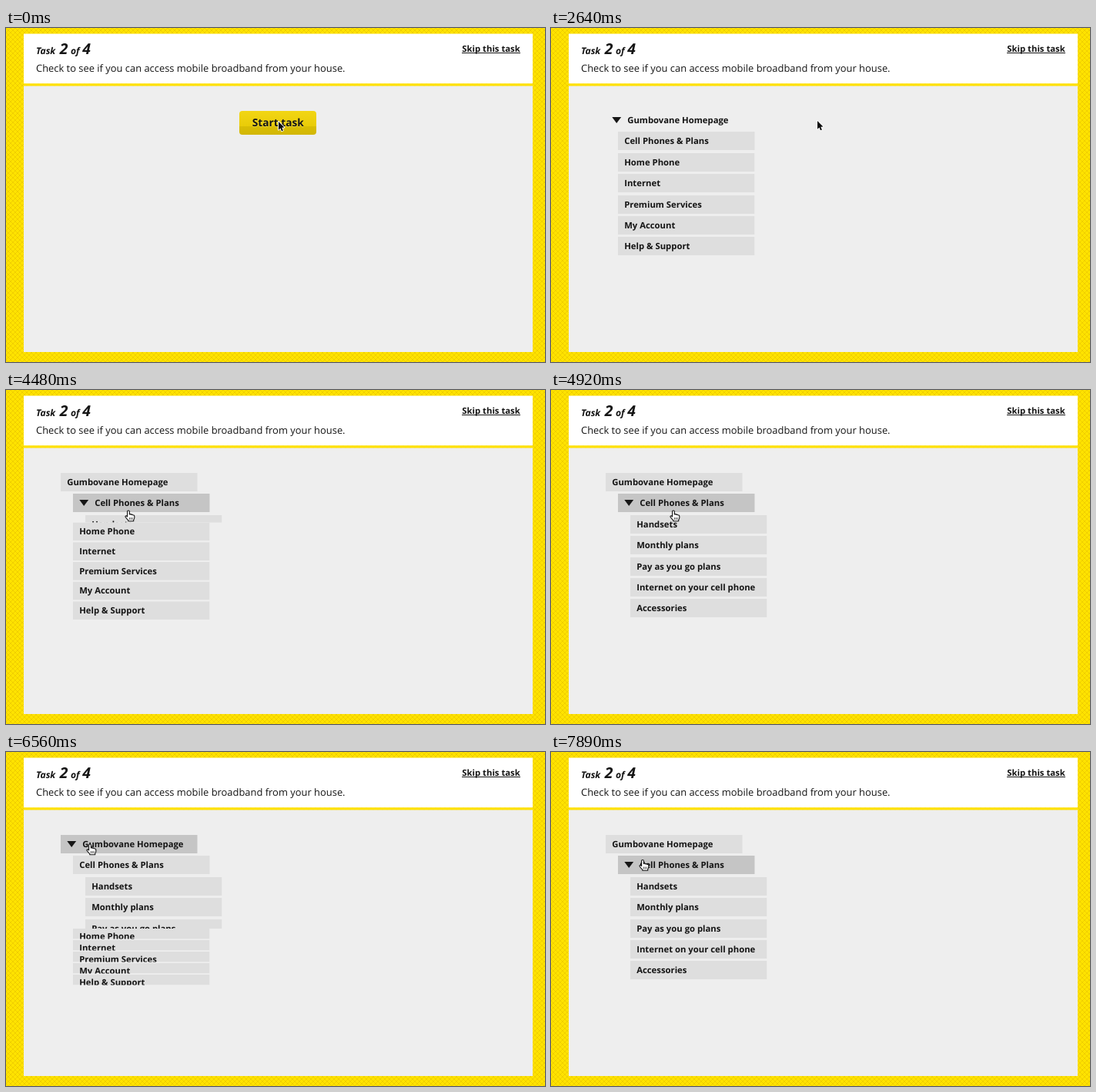
Write an HTML page with a canvas that moves like this. It is 700 px wide and 435 px high and loops after 8 s.

```html
<!DOCTYPE html>
<html lang="en">
<head>
<meta charset="utf-8">
<title>Task navigation</title>
<style>
  html, body { margin: 0; width: 100%; height: 100%; overflow: hidden; background: #ffe200; }
  canvas { display: block; width: 700px; height: 435px; }
</style>
</head>
<body>
<canvas id="stage" width="700" height="435"></canvas>
<script>
const ctx = document.getElementById('stage').getContext('2d');
const LOOP = 8000;
const PITCH = 27.4, TOP = 107.9, ROW_W = 177.5, ROW_H = 24;
const INK = '#151515', ROW = '#dedede', HOVER = '#c5c5c5';
const FONT = '"Open Sans", "Noto Sans", sans-serif';

const HOME = 'Gumbovane Homepage';
const SECTIONS = ['Cell Phones & Plans', 'Home Phone', 'Internet',
  'Premium Services', 'My Account', 'Help & Support'];
const PAGES = ['Handsets', 'Monthly plans', 'Pay as you go plans',
  'Internet on your cell phone', 'Accessories'];

// Pointer stops: time, x, y
const POINTER = [
  [0, 354, 122],
  [2500, 346, 121], [2650, 318, 119], [2800, 282, 118], [2940, 246, 118],
  [3090, 224, 119], [3240, 208, 121], [3380, 200, 124], [3530, 195, 126.5],
  [3680, 184, 134], [3830, 172, 141], [3980, 164, 146],
  [4480, 159, 157],
  [5520, 150, 153], [5670, 137, 145], [5820, 122, 134], [5970, 111.5, 125.5],
  [6120, 109, 122], [6260, 109, 120],
  [6850, 112, 127], [7000, 116, 135], [7140, 119, 140.5]
];

const ARROW = new Path2D('M0 0V10.7L2.4 8.5L4 12.2L5.9 11.4L4.3 7.8L7.4 7.6Z');
const HAND = new Path2D('M-1.4 8V1.4Q-1.4 0 0 0Q1.4 0 1.4 1.4V5Q3 4.2 3.9 5.4' +
  'Q5.4 4.7 6 6Q7.8 5.6 7.8 7.5V9.5Q7.6 11 6.7 12.3V13.8H-.2V12.6' +
  'Q-2.5 10.5 -4 8.2Q-4.2 6.6 -2.6 6.9Z');
const KNUCKLES = new Path2D('M1.4 9v3M3.3 9v3M5.2 9v3');

function makeHatch() {
  const tile = document.createElement('canvas');
  tile.width = tile.height = 6;
  const g = tile.getContext('2d');
  g.fillStyle = '#ffe300';
  g.fillRect(0, 0, 6, 6);
  g.strokeStyle = 'rgba(225, 185, 0, .55)';
  g.lineWidth = 0.9;
  g.beginPath();
  for (const d of [-6, 0, 6]) {
    g.moveTo(d - 1, -1); g.lineTo(d + 7, 7);
    g.moveTo(d + 7, -1); g.lineTo(d - 1, 7);
  }
  g.stroke();
  return ctx.createPattern(tile, 'repeat');
}
const hatch = makeHatch();

function rect(x, y, w, h, color) {
  ctx.fillStyle = color;
  ctx.fillRect(x, y, w, h);
}

function text(str, x, y, size, style = 'bold', color = INK) {
  ctx.font = `${style} ${size}px ${FONT}`;
  ctx.fillStyle = color;
  ctx.fillText(str, x, y);
}

function clipped(x, y, w, h, draw) {
  ctx.save();
  ctx.beginPath();
  ctx.rect(x, y, w, h);
  ctx.clip();
  draw();
  ctx.restore();
}

const rowY = i => Math.round(TOP + PITCH * i);
const rowX = level => Math.round(71 + 16.1 * level);

function drawPage() {
  rect(0, 0, 700, 435, hatch);
  rect(23, 7.5, 661, 65, '#fff');
  rect(23, 72.5, 661, 3, '#ffe100');
  rect(23, 75.5, 661, 346.5, '#eee');
  text('Task', 39, 34, 12.1, 'italic bold');
  text('2', 69.7, 34, 19.4, 'italic bold');
  text('of', 84, 34, 12.1, 'italic bold');
  text('4', 99.2, 34, 19.4, 'italic bold');
  text('Check to see if you can access mobile broadband from your house.', 39, 57, 12.91, 'normal');
  text('Skip this task', 592.3, 31, 11.3);
  rect(592, 32, 76, 1, INK);
}

function drawButton(pressed) {
  const fill = ctx.createLinearGradient(0, 108, 0, 139);
  fill.addColorStop(0, '#f2d614');
  fill.addColorStop(0.64, '#e9cc08');
  fill.addColorStop(0.65, '#d9be04');
  fill.addColorStop(1, '#d2b604');
  ctx.save();
  if (pressed) {
    ctx.shadowColor = 'rgba(95, 155, 215, .8)';
    ctx.shadowBlur = 5;
  }
  ctx.beginPath();
  ctx.roundRect(303, 108, 100, 31, 4);
  ctx.fillStyle = fill;
  ctx.fill();
  ctx.restore();
  text('Start task', 319.7, 129, 13.72, 'bold', 'rgba(255, 240, 120, .5)');
  text('Start task', 319.7, 128, 13.72);
}

// mode: 'link' has a box, 'open' has a marker and a box only under the pointer
function drawRow(label, level, y, tip, mode = 'link', h = ROW_H, base = 16) {
  const x = rowX(level), open = mode === 'open';
  const over = tip && tip.x >= x && tip.x < x + ROW_W && tip.y >= y && tip.y < y + h;
  if (over || !open) rect(x, y, ROW_W, h, over ? HOVER : ROW);
  if (open) {
    ctx.fillStyle = INK;
    ctx.beginPath();
    ctx.moveTo(x + 8.3, y + 8);
    ctx.lineTo(x + 20.2, y + 8);
    ctx.lineTo(x + 14.2, y + 16);
    ctx.fill();
  }
  text(label, x + (open ? 28.2 : 8.2), y + base, 11.3);
}

// Eased share of a slide that advances in a few even steps
function slide(since) {
  const step = Math.floor((since + 9) / 149);
  return 0.5 - Math.cos(Math.PI * Math.min(1, (64 + 148 * step) / 400)) / 2;
}

function menuState(t) {
  if (t < 4480) return { open: false, p: 0 };
  if (t < 6410) return { open: true, p: slide(t - 4480) };
  if (t < 7440) return { open: false, p: 1 - slide(t - 6410) };
  return { open: true, p: slide(t - 7440) };
}

function drawMenu(t, tip) {
  const { open, p } = menuState(t);
  const start = rowY(2);
  const bulge = p > 0 && p < 1 ? 5 * Math.sin(Math.PI * p) : 0;
  const shown = PITCH * PAGES.length * p + bulge;

  drawRow(HOME, 0, rowY(0), tip, open ? 'link' : 'open');
  drawRow(SECTIONS[0], 1, rowY(1), tip, open ? 'open' : 'link');

  if (p > 0) {
    clipped(rowX(2), start, ROW_W, shown, () =>
      PAGES.forEach((name, i) => drawRow(name, 2, rowY(i + 2))));
  }
  if (p < 1) {
    const pitch = PITCH * (1 - p);
    const gap = Math.min(pitch / 2, Math.max(1.5, 3 - 19 * p));
    SECTIONS.slice(1).forEach((name, i) => {
      const y = p ? start + shown + pitch * i : rowY(i + 2);
      const h = p ? pitch - gap : ROW_H;
      clipped(rowX(1), y, ROW_W, h, () =>
        drawRow(name, 1, y, null, 'link', h, 16 - 4 * p));
    });
  }
}

function drawPointer(tip, hand) {
  ctx.save();
  ctx.translate(tip.x, tip.y);
  ctx.lineJoin = 'round';
  if (hand) {
    ctx.fillStyle = '#fff';
    ctx.fill(HAND);
    ctx.strokeStyle = '#111';
    ctx.lineWidth = 1.1;
    ctx.stroke(HAND);
    ctx.lineWidth = 0.7;
    ctx.stroke(KNUCKLES);
  } else {
    ctx.strokeStyle = '#fff';
    ctx.lineWidth = 1.8;
    ctx.stroke(ARROW);
    ctx.fillStyle = '#0a0a0a';
    ctx.fill(ARROW);
  }
  ctx.restore();
}

function render(t) {
  const [, x, y] = POINTER.findLast(stop => stop[0] <= t);
  const tip = { x, y };
  drawPage();
  if (t < 1150) drawButton(t >= 1000);
  else drawMenu(t, tip);
  drawPointer(tip, t > 2500 && x < rowX(0) + ROW_W);
}

ctx.textRendering = 'geometricPrecision';
const begin = performance.now();
function tick() {
  render((performance.now() - begin) % LOOP);
  requestAnimationFrame(tick);
}
tick();
</script>
</body>
</html>
```
